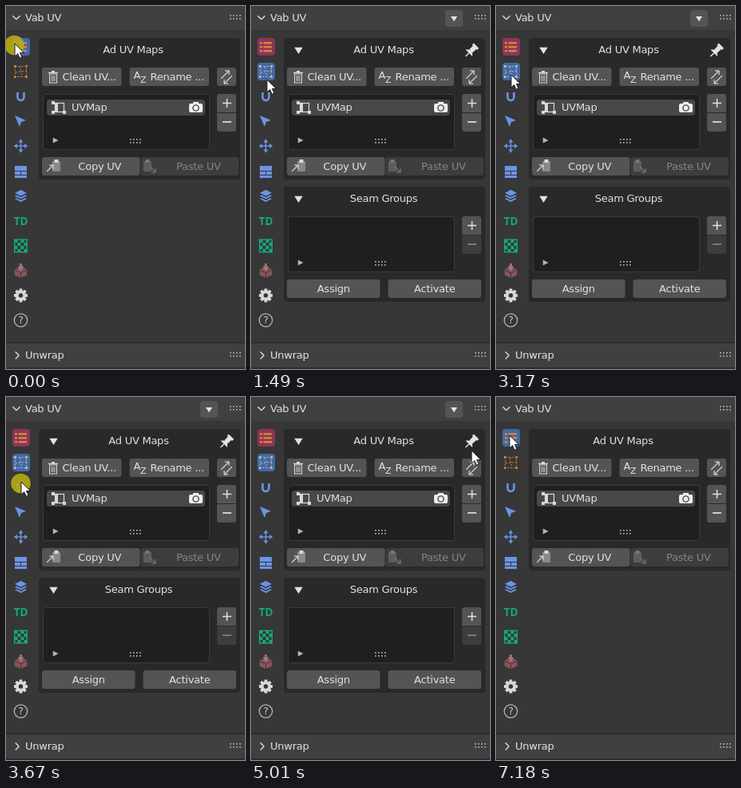
These frames come from a looping animation (299 px wide and 454 px high, 7.51 s). An HTML page with a canvas:

```html
<!DOCTYPE html>
<html lang="en">
<head>
<meta charset="utf-8">
<style>
  html, body { margin: 0; width: 100%; height: 100%; overflow: hidden; background: #373737; }
  canvas { display: block; }
</style>
</head>
<body>
<canvas id="stage" width="299" height="454"></canvas>
<script>
const c = document.getElementById('stage').getContext('2d');
const LOOP = 7510, TICK = 167;
const FACE = '"DejaVu Sans", sans-serif';
const LEFT = 45, RIGHT = 288, MID = 166;
const TEXT = '#e2e2e2', DIM = '#858585', BTN = '#545454', BODY = '#373737', PANEL = '#292929',
      BLUE = '#4169a8', SKY = '#6c94e6', ORANGE = '#d8843c', GREEN = '#12a97c',
      PALE = '#d9d9d9', RED = '#8e2222', ROSE = '#85565b';

// Pointer stops in ticks; a click shows a ring for one tick, then sets its state
const stops = [
  { at: 0, x: 11, y: 47, click: {} },
  { at: 2, x: 18, y: 53 },
  { at: 5, x: 18, y: 53 },
  { at: 8, x: 20, y: 92, click: { view: 'seams' } },
  { at: 14, x: 14, y: 110, click: { view: 'unwrap' } },
  { at: 18, x: 19, y: 86, click: { view: 'seams' } },
  { at: 22, x: 19, y: 106, click: { view: 'unwrap' } },
  { at: 26, x: 19, y: 86, click: { view: 'seams' } },
  { at: 30, x: 276, y: 67 },
  { at: 32, x: 276, y: 55 },
  { at: 34, x: 276, y: 55, click: { pinned: false } },
  { at: 39, x: 57, y: 56 },
  { at: 41, x: 17, y: 48, click: { view: '' } }
];

const ease = p => p * p * (3 - 2 * p);

function sceneAt(tick) {
  const i = stops.findLastIndex(s => s.at <= tick);
  const a = stops[i], b = stops[i + 1] || a;
  const from = a.at + (a.click ? 1 : 0);
  const p = ease(Math.min(1, Math.max(0, (tick - from) / Math.max(1, b.at - from))));
  const state = { view: '', pinned: tick >= 4 };
  for (const s of stops) if (s.at < tick) Object.assign(state, s.click);
  return {
    ...state,
    x: Math.round(a.x + (b.x - a.x) * p),
    y: Math.round(a.y + (b.y - a.y) * p),
    ring: !!a.click && tick === a.at
  };
}

function rect(x, y, w, h, color) {
  c.fillStyle = color;
  c.fillRect(x, y, w, h);
}

function box(x, y, w, h, fill, r = 4) {
  c.beginPath();
  c.roundRect(x, y, w, h, r);
  c.fillStyle = fill;
  c.fill();
}

function frame(x, y, w, h, color, width = 1) {
  c.strokeStyle = color;
  c.lineWidth = width;
  c.strokeRect(x, y, w, h);
}

function paint(fill, stroke, width) {
  if (fill) { c.fillStyle = fill; c.fill(); }
  if (stroke) { c.strokeStyle = stroke; c.lineWidth = width; c.stroke(); }
}

function line(x1, y1, x2, y2, color, width = 1.2) {
  c.beginPath();
  c.moveTo(x1, y1);
  c.lineTo(x2, y2);
  paint(null, color, width);
}

function disc(x, y, r, fill, stroke, width = 1) {
  c.beginPath();
  c.arc(x, y, r, 0, 7);
  paint(fill, stroke, width);
}

// Regular polygon; turn is the direction of its first corner
function ngon(n, x, y, rx, ry, turn, fill, stroke, width = 1) {
  c.beginPath();
  for (let i = 0; i < n; i++) {
    const a = turn + i * 2 * Math.PI / n;
    c.lineTo(x + rx * Math.cos(a), y + ry * Math.sin(a));
  }
  c.closePath();
  paint(fill, stroke, width);
}

function turned(x, y, angle, draw) {
  c.save();
  c.translate(x, y);
  c.rotate(angle);
  draw();
  c.restore();
}

function chevron(x, y, angle, size) {
  turned(x, y, angle, () => {
    line(-size / 2, -size, size / 2, 0, PALE, 1.5);
    line(size / 2, 0, -size / 2, size, PALE, 1.5);
  });
}

function arrow(x, y, angle, length, color, width = 1.2) {
  turned(x, y, angle, () => {
    line(-length, 0, 0, 0, color, width);
    line(-3.5, -3.5, 0, 0, color, width);
    line(-3.5, 3.5, 0, 0, color, width);
  });
}

function cross(x, y, r, color, width = 1.5) {
  line(x - r, y - r, x + r, y + r, color, width);
  line(x + r, y - r, x - r, y + r, color, width);
}

function plus(x, y, r, color) {
  line(x - r, y, x + r, y, color, 1.5);
  line(x, y - r, x, y + r, color, 1.5);
}

const downTri = (x, y, r = 6) => ngon(3, x, y - 1, r, r * .9, Math.PI / 2, TEXT);

function grip(x, y) {
  for (let i = 0; i < 8; i++) rect(x + (i % 4) * 4, y + (i >> 2) * 4, 1.7, 1.7, '#b0b0b0');
}

function gear(x, y, r, hole) {
  for (let i = 0; i < 8; i++)
    turned(x, y, i * Math.PI / 4, () => rect(-r * .22, -r, r * .44, r * .5, PALE));
  disc(x, y, r * .55, hole, PALE, r * .45);
}

function label(s, x, cy, align = 'center', color = TEXT, font = '13px ' + FACE) {
  c.font = font;
  c.letterSpacing = '-0.25px';
  c.textAlign = align;
  c.fillStyle = color;
  c.fillText(s, x, Math.round(cy + 4));
}

// Equal buttons across the panel; off is the index of a disabled one
function row(y, names, { gap = 1, right = RIGHT, shift = 0, off = -1, r = 3 } = {}) {
  const w = (right - LEFT - gap * (names.length - 1)) / names.length;
  names.forEach((name, i) => {
    const x = LEFT + i * (w + gap);
    box(x, y, w, 23, i === off ? '#3d3d3d' : BTN, r);
    label(name, x + w / 2 + shift, y + 11.5, 'center', i === off ? DIM : TEXT);
  });
}

function gearRow(y, name) {
  row(y, [name], { right: 263, r: [3, 0, 0, 0] });
  gear(276, y + 11.5, 8.5, PANEL);
}

function plusMinus(y, off) {
  box(264, y, 24, 23, BTN, [3, 3, 0, 0]);
  box(264, y + 24, 24, 23, off ? '#3d3d3d' : BTN, [0, 0, 3, 3]);
  plus(276.5, y + 11.5, 5.5, TEXT);
  line(271, y + 35, 282, y + 35, off ? DIM : TEXT, 1.7);
}

function list(y) {
  box(46, y, 209, 70, '#3b3b3b');
  box(47, y + 1, 207, 68, '#1f1f1f', 3);
  ngon(3, 61, y + 58, 4.5, 4, 0, '#b5b5b5');
  grip(155, y + 56);
}

function header(title, y, open) {
  rect(0, y, 299, 30, '#404040');
  if (open) chevron(13, y + 14.5, Math.PI / 2, 4.5);
  else chevron(14, y + 15, 0, 4.5);
  label(title, 24, y + 15, 'left');
  grip(280, y + 11);
}

function clipboard(x, y, color, clip) {
  box(x, y, 10, 13, color, 1);
  rect(x + 2.5, y - 2, 5, 4, clip);
}

function cube(x, y, color) {
  ngon(6, x, y, 6.5, 6.5, Math.PI / 6, null, color, 1.4);
  for (let i = 0; i < 3; i++)
    turned(x, y, i * 2 * Math.PI / 3, () => line(0, 0, 0, 6, color));
}

const icons = [
  () => {
    for (let y = 45; y < 58; y += 5) {
      rect(11, y, 3, 2.5, ORANGE);
      rect(15.5, y, 10.5, 2.5, ORANGE);
    }
  },
  (y, view) => {
    const color = view === 'seams' ? '#d2bd9c' : ORANGE;
    c.setLineDash([2, 2]);
    frame(11.5, y - 6.5, 14, 13, color);
    line(12, y + 1, 26, y - 1, color, 1);
    line(17.5, y - 6, 19.5, y + 6, color, 1);
    c.setLineDash([]);
    for (let i = 0; i < 4; i++)
      rect(10 + (i % 2) * 14.5, y - 8 + (i >> 1) * 13.5, 2.5, 2.5, color);
  },
  y => {
    c.beginPath();
    c.moveTo(14.5, y - 5);
    c.arc(18.5, y + 1, 4, Math.PI, 0, true);
    c.lineTo(22.5, y - 5);
    paint(null, SKY, 2.6);
  },
  y => {
    c.beginPath();
    c.moveTo(11, y - 7);
    c.lineTo(25, y - 1);
    c.lineTo(19, y + 1);
    c.lineTo(17, y + 7);
    paint(SKY);
  },
  y => {
    for (let i = 0; i < 4; i++)
      turned(18.5, y, i * Math.PI / 2, () => {
        rect(0, -.7, 6, 1.4, SKY);
        ngon(3, 6, 0, 2.8, 3.4, 0, SKY);
      });
  },
  y => {
    rect(11, y - 7, 15, 6, SKY);
    rect(11, y, 7, 4, SKY);
    rect(19, y, 7, 4, SKY);
    rect(11, y + 5, 15, 3, SKY);
  },
  y => {
    for (let i = 1; i >= -1; i--)
      ngon(4, 18.5, y - .5 + i * 3.7, 9, 4.6, 0, SKY, BODY, 1.4);
  },
  y => label('TD', 18.5, y + 1, 'center', GREEN, 'bold 13.5px "Noto Sans", sans-serif'),
  y => {
    frame(10.7, y - 7.8, 15.6, 15.6, GREEN, 1.4);
    for (let i = 0; i < 16; i++)
      if ((i + (i >> 2)) % 2 === 0)
        rect(10.5 + (i % 4) * 4, y - 8 + (i >> 2) * 4, 4, 4, GREEN);
  },
  y => {
    ngon(6, 18.5, y + 2, 9, 7, Math.PI / 6, ROSE);
    line(11, y - 1, 18.5, y + 3, '#4b3035', 1);
    line(26, y - 1, 18.5, y + 3, '#4b3035', 1);
    line(18.5, y + 3, 18.5, y + 9, '#4b3035', 1);
    rect(17.2, y - 9, 2.6, 5, '#a8787c');
    ngon(3, 18.5, y - 3.5, 4.5, 4, Math.PI / 2, '#a8787c');
  },
  y => gear(18.5, y, 8.5, BODY),
  y => {
    disc(18.5, y, 8.2, null, '#b5b5b5', 1.3);
    label('?', 18.5, y, 'center', '#cccccc', '12px ' + FACE);
  }
];

function sidebar({ view, pinned }) {
  const pitch = 31.1, top = 51;
  const spot = (i, color) => box(8, top - 11 + i * pitch, 22, 22, color);
  spot(0, pinned ? '#8c3558' : BLUE);
  if (view === 'seams') spot(1, BLUE);
  if (view === 'unwrap') spot(2, BLUE);
  icons.forEach((draw, i) => draw(Math.round(top + i * pitch), view));
}

function panel(title, y, h, { center = MID, arrow = true } = {}) {
  box(41, y, 252, h, PANEL);
  label(title, center, y + 15);
  if (arrow) downTri(59.5, y + 15.5);
}

function pin() {
  turned(275.5, 56, Math.PI / 4, () => {
    rect(-4.5, -9, 9, 3, TEXT);
    rect(-3, -7, 6, 7, TEXT);
    ngon(3, 0, 2, 7, 4, -Math.PI / 2, TEXT);
    rect(-.7, 2, 1.4, 8, TEXT);
  });
}

function trash(x, y) {
  line(x - 6, y - 5.5, x + 6, y - 5.5, PALE, 1.3);
  rect(x - 2, y - 8, 4, 2, PALE);
  frame(x - 4.5, y - 4, 9, 11, PALE);
  for (let i = -2; i <= 2; i += 2) line(x + i, y - 2, x + i, y + 5, PALE, .9);
}

function mapsPanel({ view, pinned }) {
  const multi = !!view;
  panel('Ad UV Maps', 40, 177, { center: multi ? MID : MID - 7, arrow: multi });
  if (pinned) pin();

  row(77, ['', ''], { gap: 10, right: 254 });
  trash(59, 89);
  label('Clean UV...', 70.5, 88.5, 'left');
  label('A', 159.5, 87, 'left');
  label('Z', 168, 92, 'left', TEXT, '11px ' + FACE);
  label('Rename ...', 180.5, 88.5, 'left');
  box(264, 77, 24, 23, BTN, 3);
  arrow(279, 81, -Math.PI / 4, 14, PALE);
  arrow(273, 97, Math.PI * .75, 14, PALE);

  list(110);
  box(51, 117, 198, 20, '#48484a');
  frame(61.5, 121.5, 11, 11, PALE, 1.2);
  rect(61, 121, 4, 12, PALE);
  for (const y of [119, 131]) rect(57, y, 4, 4, PALE);
  rect(71, 131, 4, 4, PALE);
  label('UVMap', 82, 126.5, 'left');
  box(229, 122, 17, 11, '#eeeeee', 2);
  rect(234, 120, 7, 3, '#eeeeee');
  disc(237.5, 127.5, 3.6, '#eeeeee', '#444444', 1.4);
  plusMinus(110, false);

  row(189, ['Copy UV', 'Paste UV'], { right: 291, shift: 11, off: 1 });
  clipboard(58, 194, '#898989', PALE);
  arrow(59, 199, -Math.PI / 4, 11, PALE);
  clipboard(172, 194, '#5d5d5d', '#777777');
  arrow(187, 208, Math.PI / 4, 10, '#777777');
}

function seamsPanel() {
  panel('Seam Groups', 226, 144);
  list(263);
  plusMinus(263, true);
  row(342, ['Assign', 'Activate'], { gap: 10 });
}

function unwrapPanel() {
  panel('Unwrap', 226, 240);

  gearRow(263, 'Vab Unwrap');
  frame(51.5, 268.5, 13, 13, '#8b8b8b');
  plus(58, 275, 7, '#8b8b8b');
  cross(65, 282, 2.5, RED);
  row(287, ['Unwrap constraint']);

  gearRow(320, 'Mark by Angle');
  row(344, ['Mark', 'Unmark'], { shift: 11, r: 0 });
  cube(57, 355, RED);
  plus(64, 359, 3, TEXT);
  cube(177, 355, '#858585');
  cross(184, 360, 3, RED);
  row(368, ['Unmark All'], { r: 0 });

  box(LEFT, 392, 218, 23, '#202020', [0, 0, 0, 3]);
  label('Seams by Open Edges', 51, 403.5, 'left');
  chevron(255, 404, Math.PI / 2, 3.5);
  box(264, 392, 24, 23, BTN, [0, 0, 3, 0]);
  ngon(4, 276, 403.5, 5.5, 5.5, 0, TEXT);

  row(425, ['Mirror Seams']);
}

function pointer(x, y) {
  turned(x, y, 0, () => {
    c.beginPath();
    c.moveTo(0, 0);
    c.lineTo(0, 16);
    c.lineTo(3.7, 12.6);
    c.lineTo(6.2, 18.3);
    c.lineTo(9, 17);
    c.lineTo(6.5, 11.5);
    c.lineTo(11.5, 11.5);
    c.closePath();
    paint('#ffffff', '#1a1a1a', 1);
  });
}

function draw(t) {
  const scene = sceneAt(Math.floor((t + 14) / TICK));

  rect(0, 0, 299, 454, BODY);
  header('Vab UV', 0, true);
  if (scene.view) {
    box(243, 5, 22, 21, BTN);
    downTri(254, 16, 4.7);
  }
  if (scene.view !== 'unwrap') {
    rect(0, 420, 299, 34, '#2d2d2d');
    header('Unwrap', 422, false);
  }

  sidebar(scene);
  mapsPanel(scene);
  if (scene.view === 'seams') seamsPanel();
  if (scene.view === 'unwrap') unwrapPanel();

  if (scene.ring) disc(scene.x - .5, scene.y + 2, 12.3, 'rgba(186,174,22,.88)');
  pointer(scene.x, scene.y);
}

const start = performance.now();
function tick() {
  draw((performance.now() - start) % LOOP);
  requestAnimationFrame(tick);
}
tick();
</script>
</body>
</html>
```
